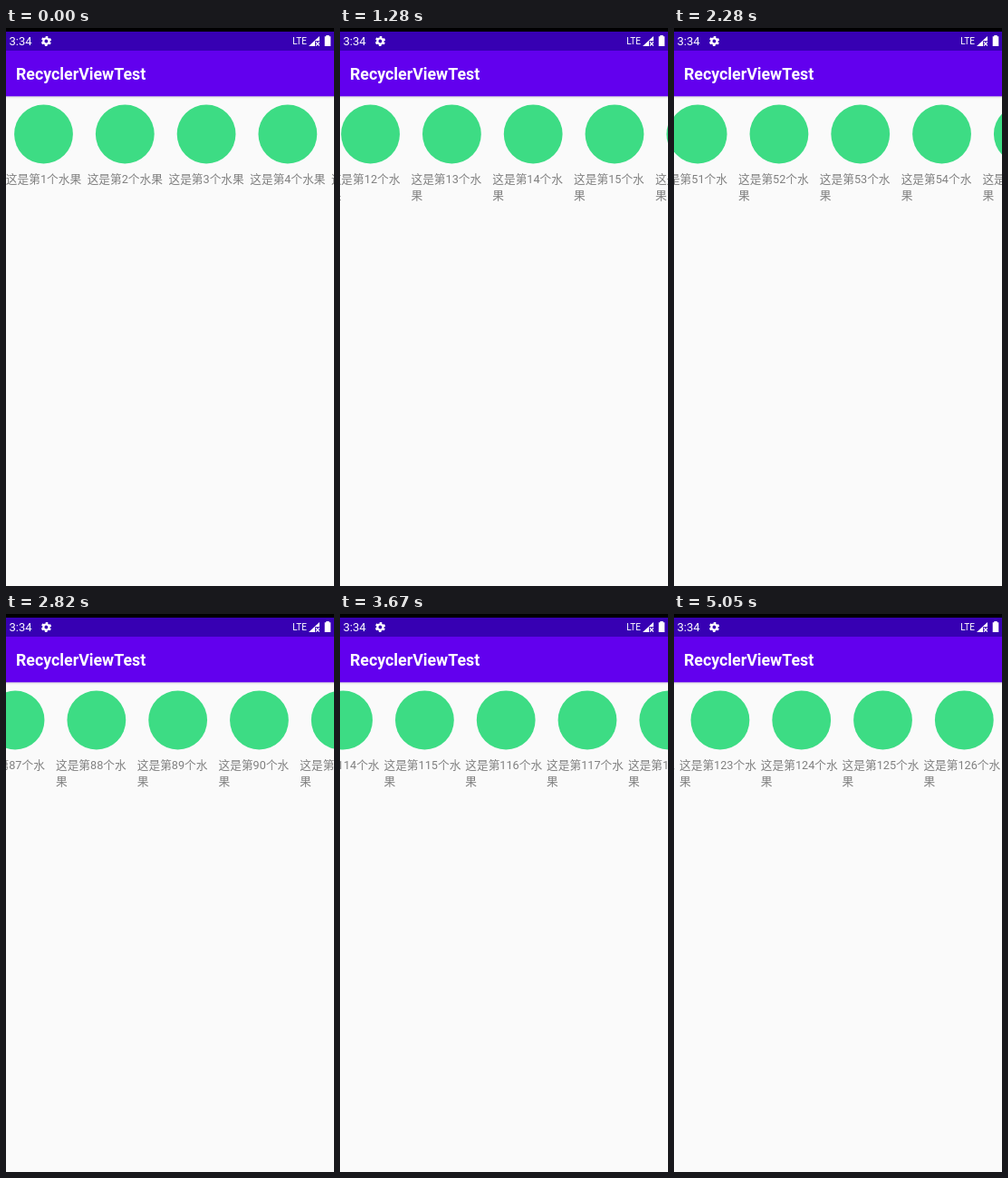
An HTML page that plays this animation: 362 px wide and 615 px high, repeating every 5.68 s.

```html
<!DOCTYPE html>
<html lang="zh-CN">
<head>
<meta charset="utf-8">
<title>RecyclerViewTest</title>
<style>
  html, body { margin: 0; width: 100%; height: 100%; overflow: hidden; background: #fafafa; }
  svg { display: block; width: 362px; height: 615px; }
  text { font-family: Roboto, "Noto Sans CJK SC", "Noto Sans CJK", sans-serif; white-space: pre; }
  .bar { fill: #fff; }
  .title { font-size: 17.8px; font-weight: 700; }
  .clock { font-size: 13px; }
  .net { font-size: 10px; }
  .item text { font-size: 12.7px; fill: #808080; }
  .item circle { fill: #3ddc84; }
</style>
</head>
<body>
<svg viewBox="0 0 362 615">
  <defs>
    <linearGradient id="shade" x2="0" y2="1">
      <stop offset="0" stop-color="#000" stop-opacity=".12"/>
      <stop offset="1" stop-color="#000" stop-opacity="0"/>
    </linearGradient>
  </defs>
  <rect width="362" height="615" fill="#fafafa"/>
  <g id="list"></g>

  <rect y="75" width="362" height="3" fill="url(#shade)"/>
  <rect width="362" height="4" fill="#000"/>
  <rect y="4" width="362" height="21" fill="#3700b3"/>
  <rect y="25" width="362" height="50.3" fill="#6200ee"/>
  <g class="bar">
    <text class="clock" x="3.5" y="19">3:34</text>
    <text class="net" x="316.2" y="18">LTE</text>
    <text class="title" x="11" y="57">RecyclerViewTest</text>
    <g transform="translate(44.4 14.5) rotate(15)" fill="none" stroke="#fff">
      <circle r="3.1" stroke-width="2.4"/>
      <circle r="4.6" stroke-width="2" stroke-dasharray="2.41"/>
    </g>
    <path d="M346 9V14.2H341V20H334Z"/>
    <path d="M341.9 15.5l4 4m0-4l-4 4" stroke="#fff" stroke-width="1.2"/>
    <path d="M353.3 9.3V8h3.4v1.3h1.6V20h-6.6V9.3Z"/>
  </g>

  <path id="pointer" d="M.5.5V16.5L4.2 13L6.8 18.5L9 17.5L6.5 12H11.5Z" fill="#fff" stroke="#000"/>
</svg>
<script>
const LOOP = 5680, PITCH = 89.8, STEPS = 66;
const list = document.getElementById('list');
const pointer = document.getElementById('pointer');

// Monotone cubic through [time, value] keys
function track(keys) {
  const rate = keys.slice(1).map(([t, v], i) => (v - keys[i][1]) / (t - keys[i][0]));
  const slope = keys.map((_, i) => {
    const a = rate[i - 1], b = rate[i];
    return a * b > 0 ? 2 * a * b / (a + b) : 0;
  });
  return time => {
    const end = keys.length - 1;
    if (time >= keys[end][0]) return keys[end][1];
    const i = keys.findIndex(k => k[0] > time) - 1;
    const [t0, v0] = keys[i], [t1, v1] = keys[i + 1];
    const d = t1 - t0, u = (time - t0) / d, w = 1 - u;
    return v0 * w * w * (1 + 2 * u) + v1 * u * u * (3 - 2 * u)
      + d * u * w * (slope[i] * w - slope[i + 1] * u);
  };
}

// Scroll offset, in items
const scroll = track([[0, 1.038], [670, 1.038], [900, 3.97], [1280, 12.126], [2280, 51.209],
  [2820, 87.388], [3670, 114.46], [4280, 121.399], [4820, 122.933]]);
const pointerX = track([[0, 322], [70, 319], [590, 243], [670, 243], [900, -20], [4440, -20],
  [4900, 301], [4970, 336], [5050, 370]]);
const pointerY = track([[0, 640], [70, 602], [590, 125], [900, 125], [4440, 150],
  [4900, 579], [4970, 604], [5050, 640]]);

// The screen refreshes in steps on a 10 ms grid
function stepStart(i) {
  if (!i) return 0;
  const t = i < 9 ? 70 + 75 * (i - 1) : 670 + 76.875 * (i - 9);
  return Math.round((t - 0.1) / 10) * 10;
}
const starts = Array.from({ length: STEPS + 1 }, (_, i) => stepStart(i));

function make(tag, attrs, parent) {
  const el = document.createElementNS('http://www.w3.org/2000/svg', tag);
  for (const k in attrs) el.setAttribute(k, attrs[k]);
  return parent.appendChild(el);
}

const items = Array.from({ length: 6 }, () => {
  const g = make('g', { class: 'item' }, list);
  make('circle', { cx: PITCH / 2, cy: 117, r: 32.4 }, g);
  return { g, top: make('text', { y: 171.2 }, g), rest: make('text', { y: 188.9 }, g) };
});

function setLabel({ top, rest }, n) {
  const short = n < 10;
  top.textContent = `这是第${n}个水${short ? '果' : ''}`;
  top.setAttribute('x', short ? PITCH / 2 : 0);
  top.setAttribute('text-anchor', short ? 'middle' : 'start');
  rest.textContent = short ? '' : '果';
}

function draw(t) {
  const pos = scroll(t), first = Math.floor(pos);
  items.forEach((item, i) => {
    const n = first + i;
    setLabel(item, n);
    item.g.setAttribute('transform', `translate(${(n - pos) * PITCH} 0)`);
  });
  pointer.setAttribute('transform', `translate(${pointerX(t)} ${pointerY(t)})`);
}

let shown = -1;
function tick() {
  const t = performance.now() % LOOP;
  const step = starts.filter(s => s <= t).length - 1;
  if (step !== shown) draw(starts[shown = step]);
  requestAnimationFrame(tick);
}
tick();
</script>
</body>
</html>
```
